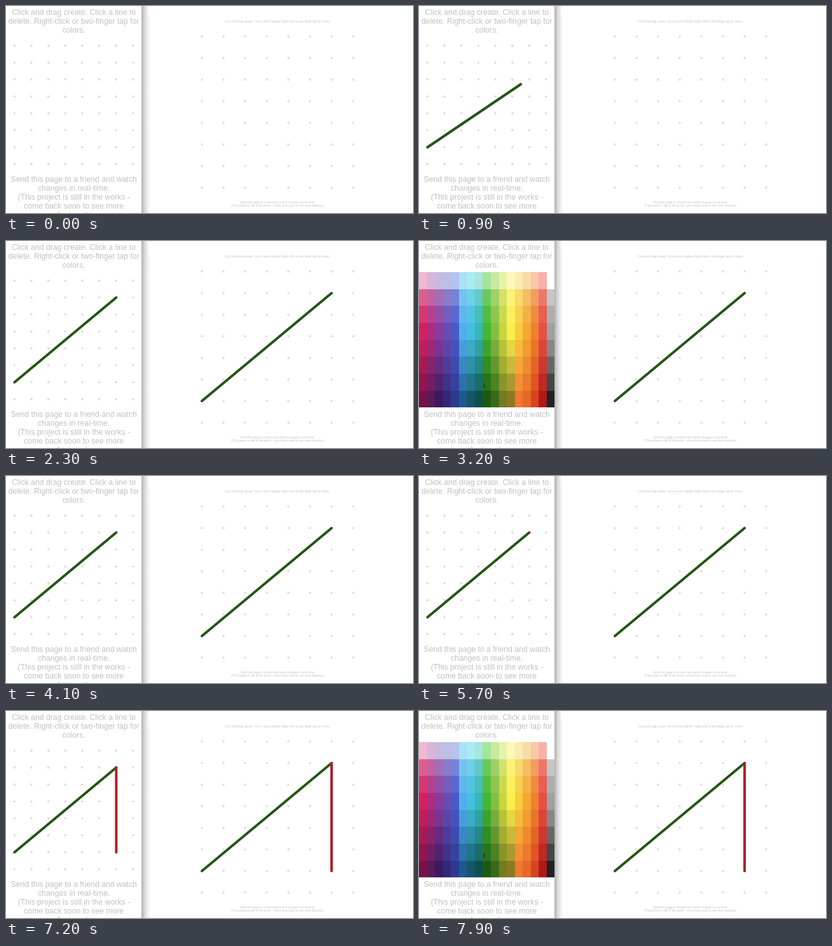
Recreate the animation shown at these times as an HTML page with a canvas. Size 640 by 326 pixels, loop 8 s.

```html
<!DOCTYPE html>
<html lang="en">
<head>
<meta charset="utf-8">
<title>Shared line drawing</title>
<style>
  html, body { margin: 0; height: 100%; overflow: hidden; background: #fff; }
  canvas { display: block; }
</style>
</head>
<body>
<canvas width="640" height="326"></canvas>
<script>
const ctx = document.querySelector('canvas').getContext('2d');
const LOOP = 8000, GREEN = '#225615', RED = '#b01f29';
const left = { x: 13.3, y: 62.4, step: 26.68, center: 106.7, font: 12.23 };
const right = { x: 308, y: 48, step: 34, center: 427, font: 4.57 };

// Palette columns: pale, full and dark shade of each hue.
const hues = `f0b8d2 d02260 7a1048|d8b6da ae2c80 581a58|c8bade 873ca0 3a1a60|bcbee6 684cb4 32287a
b8c2ee 4a58ca 2e3a90|a8e2f4 52aeec 1c5a90|a8eaf2 44bfe0 145868|a8e6de 36b6b8 0e5050
a2e698 42b832 1c5a10|c8eaa0 86be40 3a6a18|e6f2a8 c6d640 767a20|fbf8b8 fcee4a 8a7a24
fbecb0 f8cc3c f07830|f8dca8 f5a833 e86828|f8c8a8 f08030 d84420|f8b0a8 e65040 b01818
ffffff a0a0a0 222222`.split(/[|\n]/).map(column => column.split(' ').map(hex =>
  [0, 2, 4].map(i => parseInt(hex.slice(i, i + 2), 16))));
const tones = [0, .6, .85, 1, 1.2, 1.45, 1.72, 2];

const clamp = v => Math.max(0, Math.min(1, v));
const ease = v => v * v * (3 - 2 * v);
const mix = (a, b, p) => a + (b - a) * p;
const progress = (t, from, to) => clamp((t - from) / (to - from));

function text(pane, baseline, lineHeight, color, lines) {
  ctx.font = `${pane.font}px "Liberation Sans", Arial, sans-serif`;
  ctx.textAlign = 'center';
  ctx.fillStyle = color;
  lines.forEach((line, i) => ctx.fillText(line, pane.center, baseline + i * lineHeight));
}

function dots(pane) {
  ctx.fillStyle = '#dcdcdc';
  for (let i = 0; i < 64; i++) {
    ctx.beginPath();
    ctx.arc(pane.x + i % 8 * pane.step, pane.y + (i >> 3) * pane.step, 1.8, 0, 7);
    ctx.fill();
  }
}

// Line ends are given in grid units.
function line(pane, color, x1, y1, x2, y2) {
  ctx.strokeStyle = color;
  ctx.lineWidth = 4;
  ctx.lineCap = 'round';
  ctx.beginPath();
  ctx.moveTo(pane.x + x1 * pane.step, pane.y + y1 * pane.step);
  ctx.lineTo(pane.x + x2 * pane.step, pane.y + y2 * pane.step);
  ctx.stroke();
}

function palette() {
  const edge = i => Math.round(i * 213.4 / 17);
  const rowEdge = i => Math.round(49 + i * 26.68);
  hues.forEach((shades, col) => tones.forEach((tone, row) => {
    const k = Math.min(1, Math.floor(tone));
    const rgb = shades[k].map((v, i) => Math.round(mix(v, shades[k + 1][i], tone - k)));
    ctx.fillStyle = `rgb(${rgb})`;
    ctx.fillRect(edge(col), rowEdge(row), edge(col + 1) - edge(col), rowEdge(row + 1) - rowEdge(row));
  }));
  ctx.fillStyle = '#174010';
  ctx.fillRect(102, 224, 1.5, 8);
}

function divider() {
  const shade = ctx.createLinearGradient(213, 0, 224, 0);
  shade.addColorStop(0, '#b0b0b0');
  shade.addColorStop(.4, '#d4d4d4');
  shade.addColorStop(1, '#f8f8f8');
  ctx.fillStyle = shade;
  ctx.fillRect(213, 0, 11, 326);
  ctx.fillStyle = '#ececec';
  ctx.fillRect(224, 16, 1, 310);
}

function drawLeftLines(t) {
  if (t >= 500) {
    const drag = ease(progress(t, 420, 900)), turn = progress(t, 1000, 1400);
    let x = mix(mix(0, 5.5, drag), 6, turn);
    let y = mix(mix(6, 2.28, drag), 1.16, turn);
    if (t >= 1600) [x, y] = [6, 1];
    line(left, GREEN, 0, 6, x, y);
  }
  if (t >= 5700) {
    const y = mix(1, 5.8, ease(progress(t, 5700, 6400))) + .2 * progress(t, 6500, 6700);
    line(left, RED, 6, 1, 6, y);
  }
}

function draw(now) {
  const t = Math.floor(now % LOOP / 100) * 100;
  ctx.fillStyle = '#fff';
  ctx.fillRect(0, 0, 640, 326);

  text(left, 14, 14, '#c1c1c1', ['Click and drag create. Click a line to',
    'delete. Right-click or two-finger tap for', 'colors.']);
  text(left, 277, 14, '#c1c1c1', ['Send this page to a friend and watch', 'changes in real-time.',
    '(This project is still in the works -', 'come back soon to see more', 'features).']);
  text(right, 25.6, 5.2, '#c4c4c4', ['Click and drag create. Click a line to delete. ' +
    'Right-click or two-finger tap for colors.']);
  text(right, 310.8, 5.2, '#c4c4c4', ['Send this page to a friend and watch changes in real-time.',
    '(This project is still in the works - come back soon to see more features).']);

  if (t >= 3200 && t < 4100 || t >= 7900) {
    palette();
  } else {
    dots(left);
    drawLeftLines(t);
  }
  divider();
  dots(right);
  if (t >= 2100) line(right, GREEN, 0, 6, 6, 1);
  if (t >= 7100) line(right, RED, 6, 1, 6, 6);
}

const start = performance.now();
function tick() {
  draw(performance.now() - start);
  requestAnimationFrame(tick);
}
tick();
</script>
</body>
</html>
```
